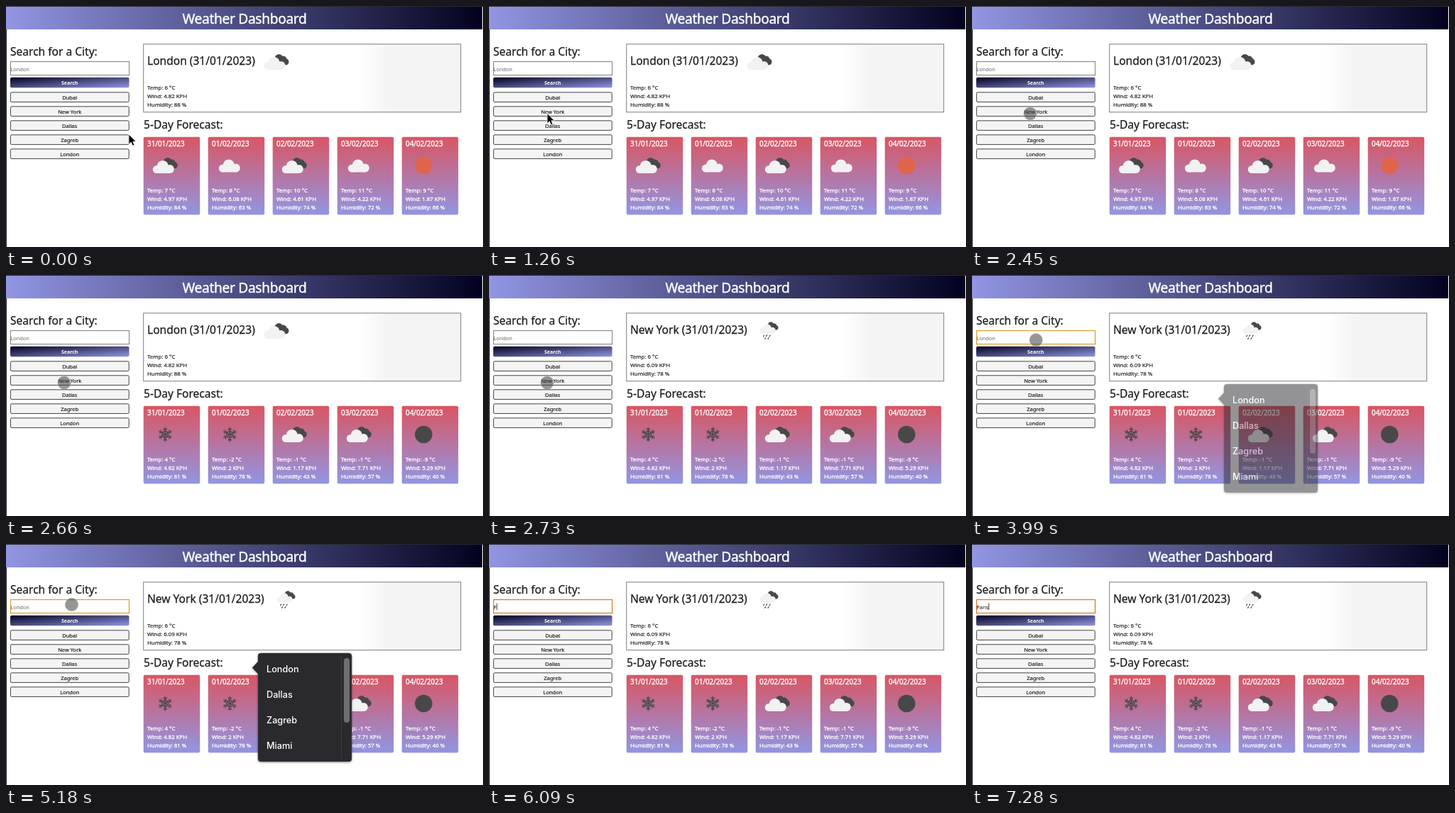
Recreate the animation shown at these times as an HTML page. Size 672 by 340 pixels, loop 8 s.

```html
<!DOCTYPE html>
<html lang="en">
<head>
<meta charset="utf-8">
<title>Weather Dashboard</title>
<style>
html, body { margin: 0; width: 672px; height: 340px; overflow: hidden; background: #fff; }
svg { display: block; font-family: "Noto Sans", "Open Sans", sans-serif; fill: #1c1c1c; }
text { stroke: #1c1c1c; stroke-width: .18px; }
.title { font-size: 19.2px; letter-spacing: -0.018em; fill: #fff; stroke: #fff; stroke-width: .4px; }
.head { font-size: 15.55px; stroke-width: .25px; }
.date { font-size: 9.9px; fill: #fff; stroke: #fff; stroke-width: .35px; }
.info { font-size: 7.85px; }
.white { fill: #fff; stroke: #fff; stroke-width: .3px; }
.btn { font-size: 7.5px; }
.entry { font-size: 7.4px; stroke: none; }
.bold { font-size: 7px; font-weight: 700; fill: #fff; stroke: none; }
.menu { font: 500 12.7px Inter, sans-serif; fill: #fff; stroke: none; }
</style>
</head>
<body>
<svg width="672" height="340" viewBox="0 0 672 340">
  <defs>
    <linearGradient id="bar"><stop offset="0" stop-color="#9295e2"/><stop offset="1" stop-color="#02021f"/></linearGradient>
    <linearGradient id="go" x2="1" y2="1"><stop offset="0" stop-color="#02021f"/><stop offset="1" stop-color="#9295e2"/></linearGradient>
    <linearGradient id="sky" x2="0" y2="1"><stop offset="0" stop-color="#d95663"/><stop offset="1" stop-color="#9295e2"/></linearGradient>
    <linearGradient id="pane"><stop offset=".68" stop-color="#fff"/><stop offset=".77" stop-color="#f4f4f4"/></linearGradient>
    <filter id="soft" x="-20%" y="-20%" width="140%" height="140%">
      <feDropShadow dx="0" dy="1" stdDeviation="1.5" flood-opacity=".4"/>
    </filter>
    <g id="puff">
      <circle cx="-12" cy="5.5" r="5.5"/><circle cx="-3.5" cy="1" r="8"/><circle cx="6.5" cy="5" r="6"/>
      <rect x="-12" y="3" width="19" height="8"/>
    </g>
    <g id="cloud"><use href="#puff" x="2" y="-1.5" fill="#f2f2f2"/></g>
    <g id="clouds">
      <g fill="#484848"><circle cx="3.5" cy="-5" r="6"/><circle cx="9.5" cy="-3.5" r="5"/><circle cx="13" cy="-.3" r="4.5"/><rect x="4" y="-3" width="9.5" height="7.2"/></g>
      <use href="#puff" fill="#f2f2f2"/>
    </g>
    <g id="rain">
      <use href="#clouds" transform="translate(-1 -4.5) scale(.74)"/>
      <path d="M-8 6.2l-.8 1.6M-4 5.8l-.8 1.6M.5 6.2l-.8 1.6M-6 9.6l-.8 1.6M-1.6 9.6l-.8 1.6" stroke="#484848" stroke-width="1.3" stroke-linecap="round"/>
    </g>
    <circle id="sun" r="12.3" fill="#e0644b"/>
    <circle id="moon" r="12.3" fill="#484848"/>
    <g id="snow" fill="none" stroke="#484848" stroke-width="1.3"></g>
  </defs>

  <rect width="672" height="340" fill="#fff"/>
  <rect width="671" height="33" fill="url(#bar)"/>
  <path d="M0 .5H672M.5 33V340" stroke="#2a2a2e"/>
  <text class="title" x="336" y="25" text-anchor="middle">Weather Dashboard</text>

  <text class="head" x="6" y="70">Search for a City:</text>
  <rect id="box" x="6.5" y="78.5" width="167" height="19" fill="#fff"/>
  <text id="entry" class="entry" x="6.3" y="92"></text>
  <path id="caret" d="M0 83.5V93" stroke="#111" stroke-width=".8"/>
  <rect x="6" y="100.7" width="167.5" height="14.6" rx="2" fill="url(#go)"/>
  <text class="bold" x="89.7" y="111" text-anchor="middle">Search</text>
  <g id="cities"></g>

  <rect x="193.7" y="53.8" width="447" height="95.9" fill="url(#pane)" stroke="#7c7c7c"/>
  <g id="now"></g>
  <text class="head" x="194" y="173">5-Day Forecast:</text>
  <g id="cards"></g>

  <g id="menu">
    <path filter="url(#soft)" fill="#2a2b2d" stroke="#4a4b4d" stroke-width=".5" d="M359 154H483a4 4 0 0 1 4 4V303a4 4 0 0 1-4 4H359a4 4 0 0 1-4-4V183L347 174.5 355 166V158a4 4 0 0 1 4-4Z"/>
    <path d="M472.5 158V303" stroke="#3b3c3e"/>
    <rect x="476" y="161" width="8" height="91" rx="4" fill="#6d6e70"/>
    <g id="items"></g>
  </g>

  <circle id="ring" r="22" fill="none" stroke="#222" stroke-width="1.6"/>
  <circle id="touch" r="9.2" fill="#4a4a4a" fill-opacity=".58" stroke="#b4b4bc" stroke-opacity=".7" stroke-width=".9"/>
  <path id="arrow" d="M0 0V14.2L3.2 11.2 5.4 16.2 7.9 15.1 5.8 10.3H10.2Z" fill="#000" stroke="#fff" stroke-width=".8"/>
</svg>
<script>
const LOOP = 8000, STEP = 70;
const el = id => document.getElementById(id);
const show = (id, on) => el(id).setAttribute("visibility", on ? "visible" : "hidden");
const move = (id, [x, y]) => el(id).setAttribute("transform", `translate(${x} ${y})`);
const text = (cls, x, y, s, more = "") => `<text class="${cls}" x="${x}" y="${y}" ${more}>${s}</text>`;
const icon = (name, x, y) => `<use href="#${name}" x="${x}" y="${y}"/>`;

const dates = ["31/01/2023", "01/02/2023", "02/02/2023", "03/02/2023", "04/02/2023"];
// icon, temperature, wind, humidity
const london = {
  name: "London", iconX: 381, now: ["clouds", 6, 4.82, 88],
  days: [["clouds", 7, 4.97, 84], ["cloud", 8, 6.08, 63], ["clouds", 10, 4.61, 74], ["cloud", 11, 4.22, 72], ["sun", 9, 1.87, 66]]
};
const newYork = {
  name: "New York", iconX: 395.5, now: ["rain", 6, 6.09, 78],
  days: [["snow", 4, 4.82, 81], ["snow", -2, 2, 78], ["clouds", -1, 1.17, 43], ["clouds", -1, 7.71, 57], ["moon", -9, 5.29, 40]]
};

const stats = (cls, x, y, [, temp, wind, wet]) =>
  [`Temp: ${temp} °C`, `Wind: ${wind} KPH`, `Humidity: ${wet} %`]
    .map((s, i) => text(cls, x, y + i * 12, s)).join("");

function drawNow(city) {
  el("now").innerHTML = text("head", 199, 83, `${city.name} (${dates[0]})`) +
    icon(city.now[0], city.iconX, 79) + stats("info", 199, 118, city.now);
}

function drawCards(city) {
  el("cards").innerHTML = city.days.map((day, i) => {
    const x = 194 + i * 91;
    return `<rect x="${x - .3}" y="184.8" width="79.5" height="109.7" rx="2" fill="url(#sky)"/>` +
      text("date", x + 5, 198, dates[i]) + icon(day[0], x + 30.3, 225) +
      stats("info white", x + 5, 263, day);
  }).join("");
}

el("snow").innerHTML = [0, 1, 2, 3, 4, 5].map(i =>
  `<path transform="rotate(${i * 60})" d="M0 0V-10.3M-2.6-8.4L0-6 2.6-8.4M-2.2-5L0-2.8 2.2-5"/>`).join("");
el("cities").innerHTML = ["Dubai", "New York", "Dallas", "Zagreb", "London"].map((s, i) =>
  `<rect x="6.4" y="${121.8 + i * 20}" width="166.8" height="13.6" rx="1.6" fill="#f4f4f4" stroke="#222" stroke-width=".85"/>` +
  text("btn", 89.7, 131.5 + i * 20, s, 'text-anchor="middle"')).join("");
el("items").innerHTML = ["London", "Dallas", "Zagreb", "Miami"].map((s, i) =>
  text("menu", 367, 181 + i * 36, s)).join("");

// pointer stops: time, x, y
const path = [
  [0, 173, 181], [210, 69, 84], [280, 68.5, 82], [630, 73, 108], [910, 78, 134], [1120, 81, 148.5], [1260, 82, 151.5],
  [2940, 82, 152], [3080, 86.5, 130], [3220, 85.5, 102], [3360, 84.8, 98.5], [3430, 84.8, 98.5],
  [3640, 90, 91.5], [4690, 90.5, 92], [4830, 92, 85.5], [5110, 92, 85.5], [5180, 92.5, 85.5]
];

function pointer(t) {
  const i = path.findIndex(p => p[0] > t);
  if (i < 0) return path[path.length - 1].slice(1);
  const [a, ax, ay] = path[i - 1], [b, bx, by] = path[i];
  const k = (t - a) / (b - a);
  return [ax + (bx - ax) * k, ay + (by - ay) * k];
}

const clicks = [[1680, 1820], [2310, 2450], [3780, 3920]];
const keys = [6090, 6440, 6720, 7000, 7280];
const shown = {};

// redraw a part only when its city changes
function update(part, city, draw) {
  if (shown[part] !== city) draw(shown[part] = city);
}

function render(ms) {
  const t = Math.floor(ms / STEP) * STEP;
  update("cards", t < 2590 ? london : newYork, drawCards);
  update("now", t < 2730 ? london : newYork, drawNow);

  const typed = "Paris".slice(0, keys.filter(k => t >= k).length);
  const entry = el("entry");
  entry.textContent = typed || "London";
  entry.setAttribute("fill", typed ? "#111" : "#666");
  show("caret", typed);
  if (typed) move("caret", [6.6 + entry.getComputedTextLength(), 0]);

  const focus = t >= 3920;
  el("box").setAttribute("stroke", typed ? "#dd7c2c" : focus ? "#e0a02e" : "#808080");
  el("box").setAttribute("stroke-width", focus ? 1.3 : 1);
  show("menu", focus && !typed);
  el("menu").setAttribute("opacity", Math.max(0, Math.min(1, (t - 3850) / 280)));

  const at = pointer(t);
  ["arrow", "touch", "ring"].forEach(id => move(id, at));
  show("arrow", t < 1820);
  show("touch", t >= 1820 && t < 5880);
  show("ring", clicks.some(([a, b]) => t >= a && t < b));
}

let start;
function tick(now) {
  start ??= now;
  render((now - start) % LOOP);
  requestAnimationFrame(tick);
}
render(0);
requestAnimationFrame(tick);
</script>
</body>
</html>
```
